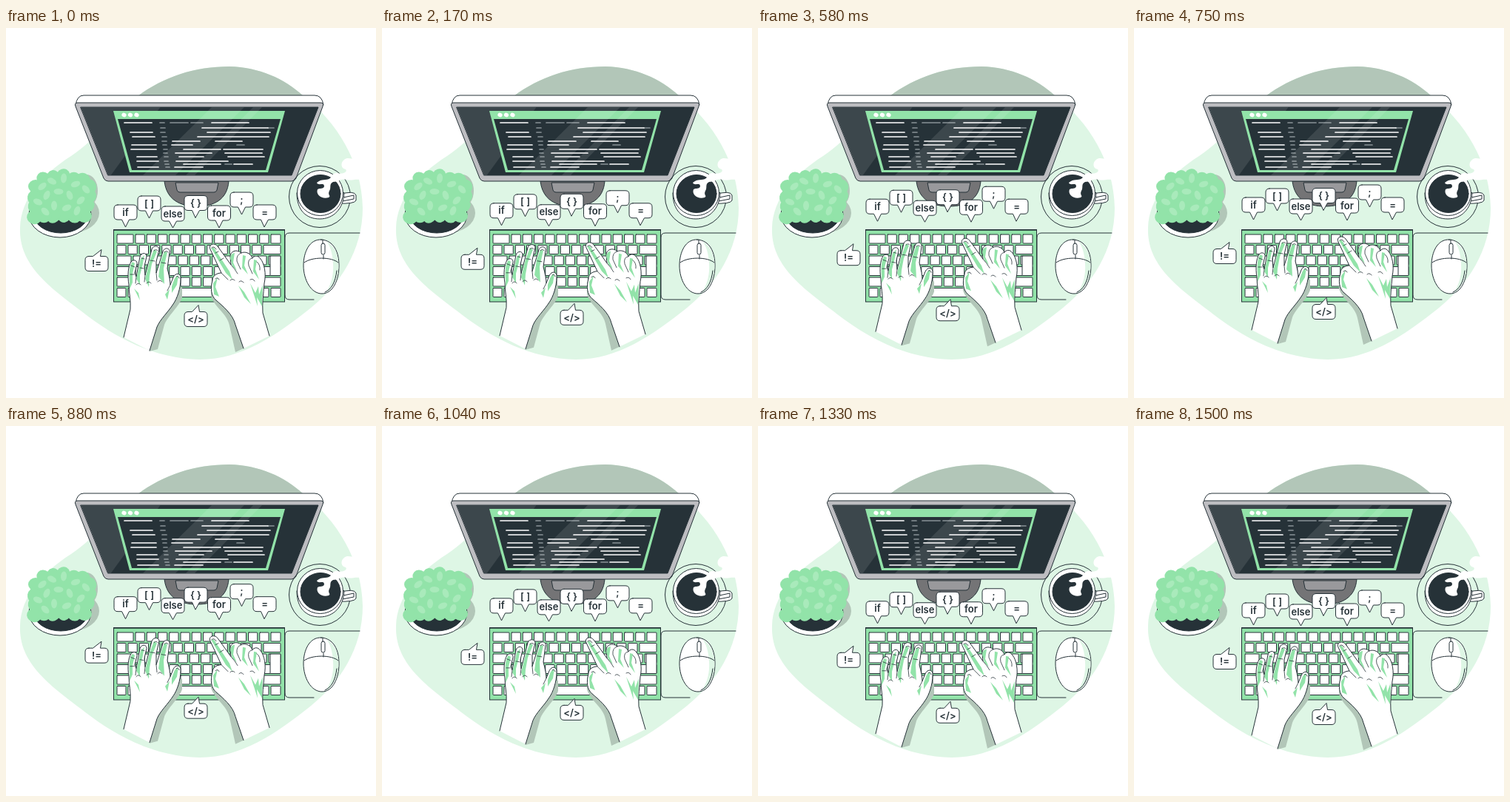
Write an HTML page that moves like this. It is 500 px wide and 500 px high and loops after 1540 ms.

```html
<!DOCTYPE html>
<html lang="en">
<head>
<meta charset="utf-8">
<title>Typing code</title>
<style>
html, body { margin: 0; height: 100%; overflow: hidden; background: #fff; }
svg { display: block; width: 100vw; height: 100vh; }
.line { fill: none; }
.line, .white, .dark { stroke: #263238; stroke-linecap: round; stroke-linejoin: round; }
.white { fill: #fff; }
.dark { fill: #263238; }
.green { fill: #92e3a9; }
.pale { fill: #def6e5; }
.shade { fill: #b2c6b8; }
text { font: 600 13px Inter, "Open Sans", sans-serif; fill: #263238; text-anchor: middle; }
</style>
</head>
<body>
<svg viewBox="0 0 500 500">
  <defs>
    <path id="blob" d="M19 270C20 230 50 197 88 173C123 150 148 114 178 92C213 66 255 52 302 52C342 53 376 68 402 92C447 127 481 181 482 243C482 301 451 347 411 379C367 414 319 448 262 448C202 447 149 420 101 382C59 350 17 320 19 270Z"/>
    <clipPath id="inBlob"><use href="#blob"/></clipPath>
    <clipPath id="inScreen"><path d="M101 107H422L386 199H138Z"/></clipPath>
  </defs>
  <use href="#blob" class="pale"/>
  <path class="shade" clip-path="url(#inBlob)" d="M0 0H500V92H0Z"/>

  <g id="stand">
    <path d="M214 207C217 232 235 241 258 241S299 232 301 207Z" fill="#747476" stroke="#263238"/>
    <path d="M229 209H287L285 219Q284 222 281 222H235Q232 222 231 219Z" fill="#99999c" stroke="#263238"/>
  </g>

  <g id="monitor">
    <path class="white" d="M94 104Q96 91 105 91H417Q427 91 429 104L424 109H99Z"/>
    <path d="M97 101H425Q430 101 428 106L392 203Q390 207 386 207H138Q134 207 132 203L94 106Q92 101 97 101Z" fill="#bdbdc1" stroke="#263238"/>
    <path class="dark" d="M101 107H422L386 199H138Z"/>
    <g clip-path="url(#inScreen)" fill="#fff" opacity=".1">
      <path d="M95 105H210L141 200H130Z"/>
    </g>
    <path class="green" d="M145 112H377L354 195H167Z"/>
    <path d="M151 123H371L351 192H170Z" fill="#263238"/>
    <g fill="#fff">
      <ellipse cx="159.500" cy="117.500" rx="3.200" ry="2.700" transform="rotate(25 159.500 117.500)"/>
      <ellipse cx="168" cy="117.500" rx="3.200" ry="2.700" transform="rotate(25 168 117.500)"/>
      <ellipse cx="176.500" cy="117.500" rx="3.200" ry="2.700" transform="rotate(25 176.500 117.500)"/>
    </g>
    <path class="line" d="M208 128h6m8 0h24m4 0h16M209 135h6m139 0h8M209 141h6M211 147h6M211 153h6M212 158h5m95 0h10M213 164h5M213 169h5M214 174h5M214 180h5M215 184h5m76 0h9M216 188h5" style="stroke:#899296;stroke-width:1.700"/>
    <path class="line" d="M160 128h37m81 0h50M265 135h89M168 141h30m74 0h85M171 147h30m58 0h96M225 153h37m21 0h36M170 158h33m21 0h28M169 164h34m37 0h50m4 0h53M229 169h49m18 0h50M177 174h27m30 0h33m33 0h49M177 180h29m24 0h70M240 184h50m18 0h25M178 188h28m22 0h38" style="stroke:#fff;stroke-width:1.700"/>
    <g clip-path="url(#inScreen)" fill="#fff" opacity=".1">
      <path d="M278 107H322L228 200H184ZM334 107H346L254 200H242Z"/>
    </g>
  </g>

  <g id="plant">
    <ellipse class="shade" cx="88" cy="250" rx="38" ry="27"/>
    <ellipse class="shade" cx="109" cy="220" rx="15" ry="22"/>
    <ellipse class="white" cx="73" cy="252" rx="42" ry="31"/>
    <ellipse class="dark" cx="74" cy="251" rx="37" ry="26"/>
    <g id="leaves" class="green"></g>
  </g>

  <g id="coffee">
    <circle class="line" cx="424" cy="228" r="41.500"/>
    <path class="white" d="M450 225Q471 219 473 226V233Q471 238 448 237ZM456 229L470 226V231L455 234Z"/>
    <path class="white" d="M393 223C393 247 406 258 424 258S456 245 457 223Z"/>
    <ellipse class="white" cx="424.500" cy="223" rx="31" ry="30.500"/>
    <ellipse class="dark" cx="425" cy="224" rx="27" ry="25.500"/>
    <path d="M420 209C427 203 432 207 438 203C443 198 440 196 448 196C456 198 462 194 459 191C452 190 452 181 457 178C463 173 468 180 482 176V206C474 203 466 207 460 205C452 203 450 208 442 208C436 211 440 216 437 220C434 226 440 227 436 229C428 232 418 226 421 218C424 216 429 218 430 214C430 208 422 214 420 209Z" fill="#fff"/>
  </g>

  <g id="mouse">
    <path class="line" d="M478 277H383Q377 277 377 283V361Q377 367 383 367H416"/>
    <path class="white" d="M426 286C410 285 402 303 402 321C402 340 412 359 427 359S450 340 450 321C450 303 443 287 426 286Z"/>
    <path class="pale" d="M433 288.500C445 294 449.500 308 449.500 321C449.500 338 441 354 432 358C440 346 443 333 442 318C441 304 438 294 433 288.500Z"/>
    <path class="line" d="M403 317C413 309 440 309 449 317M428 286V293M429 307V312M447 328C445 344 440 353 431 357"/>
    <rect class="white" x="426" y="291" width="5" height="15" rx="2.500"/>
  </g>

  <g id="keyboard">
    <rect class="green" x="145.500" y="272.500" width="231" height="97.500" stroke="#263238"/>
    <path class="line" d="M146 273H376" stroke-width="1.500"/>
    <g id="keys"></g>
  </g>

  <g id="floating">
    <path class="shade" d="M225 350H238V364C235 375 218 390 214 401L205 434L194 437L198 400ZM277 345V362C282 378 299 386 302 402L310 438L321 433L314 380Z"/>
    <g id="leftHand">
      <path class="white" d="M159 418L168 380C169 368 166 358 166 347C164 334 165 322 169 316C172 312 178 314 177 319L174 331L176 336L181 309C183 303 190 303 190 309L187 322L188 334L197 299C199 293 207 294 207 299L203 316L203 331L212 302C214 296 222 297 221 303L218 325Q222 340 222 347L226 337C229 330 237 331 236 339C236 352 231 366 226 373C219 384 208 394 204 404L194 436"/>
      <path class="green" d="M167 343C166 330 167 320 171 316L174 318L171 332V344L167 353ZM182 312L187 307L184 323L181 334L181 347L176 339ZM194 315L200 299L204 302L197 319L194 335L193 350L188 339ZM209 315L214 302L218 303L213 325L214 346L206 336ZM224 349L228 338L233 334L231 347L224 358ZM215 360L221 353L218 367ZM173 352L179 358L181 368Z"/>
      <path class="line" d="M176 336L175 345M188 334L187 343M203 331L204 341M222 347L218 355M200 301Q203 298 205 301M214 303Q217 300 219 303M230 336Q233 334 234 338M169 321l5 2M183 311l4 1M168 333l5 0M181 324l5 1M195 314l6 1M210 317l6 1M176 347q3-4 6 0M190 345q3-4 6 0M205 343q3-4 6 0" stroke-width=".8"/>
    </g>
    <g id="rightHand">
      <path class="white" d="M356 416L347 385C346 370 348 360 349 345C352 332 349 318 344 312C340 306 335 308 333 311C330 303 322 302 318 304C311 298 303 302 303 309L304 320L286 295C281 289 273 293 276 299L291 331C286 331 279 334 279 341C276 352 277 362 284 368C292 375 307 387 310 401L321 433"/>
      <path class="green" d="M277 297L281 297L302 329L306 340L297 331ZM303 311Q304 304 309 304L307 317L312 328L306 322ZM320 307L324 308L322 321L327 333L319 324ZM335 313L339 314L337 326L342 340L334 329ZM280 345L286 337L283 350L288 363L281 360ZM314 348L322 357L331 373L322 364ZM330 345L337 358L341 349L342 360L347 347L346 376L339 364L340 376Z"/>
      <path class="line" d="M304 320Q309 325 313 332M318 304Q311 306 312 315L317 326M333 311Q326 312 328 321L333 332M291 331L300 340M278 297Q281 294 284 299M283 304l4-2M289 314l5-3M283 339Q286 336 288 340M315 343q3-3 6 1M330 340q4-2 6 2M303 341q3-3 6 0M339 316q5 4 4 11" stroke-width=".8"/>
    </g>
    <g id="bubbles"></g>
  </g>
</svg>
<script>
const $ = id => document.getElementById(id);
const STEP = 1000 / 24, LOOP = 1540, CYCLE = 1500, LIFT = 10;

// Each row: width of the first key and number of regular keys; the last key fills the rest.
const rows = [[22, 12], [12, 12], [19, 12], [22, 11], [22, 11]];
const PITCH = 15.25, RIGHT = 371;
const key = (x, y, w, h = 12) => `<rect class="white" x="${x}" y="${y}" width="${w}" height="${h}" rx=".7"/>`;
let keys = '';
rows.forEach(([first, count], r) => {
  const y = 279 + r * 14.5, start = 153 + first, last = start + count * PITCH;
  keys += key(150, y, first) + key(last, y, RIGHT - last);
  for (let i = 0; i < count; i++) keys += key(start + i * PITCH, y, PITCH - 3);
});
keys += key(357, 308, 14, 26.5);
for (const [x, w] of [[150, 12], [165, 12], [180, 12], [196, 12], [211, 80], [294, 12], [309, 12], [326, 12], [342, 13], [358, 13]])
  keys += key(x, 351.5, w);
$('keys').innerHTML = keys;

const leaf = (x, y, rx, ry, turn = 0) => `<ellipse rx="${rx}" ry="${ry}" transform="translate(${x} ${y}) rotate(${turn})"/>`;
const lobes = [[40, 214], [51, 204], [64, 202], [77, 200], [91, 204], [104, 205], [113, 214], [113, 227], [110, 240], [106, 254], [92, 254], [78, 253], [64, 254], [52, 254], [38, 256], [39, 242], [38, 229]];
const dabs = [[49, 214], [62, 207], [78, 203], [94, 211], [108, 218], [55, 226], [71, 221], [86, 226], [101, 233], [43, 235], [65, 240], [82, 243], [53, 248], [96, 247]];
$('leaves').innerHTML = leaf(76, 228, 38, 32)
  + lobes.map(([x, y], i) => leaf(x, y, 10, 9, i * 40)).join('')
  + '<g fill="#a9eabb">' + dabs.map(([x, y], i) => leaf(x, y, 6.5, 4, i * 67 - 40)).join('') + '</g>';

// Text, left and top edge, tail tip relative to the box; a negative tip points up.
const bubbles = [
  ['if', 146, 239, 15.5, 30], ['[ ]', 178, 227, 15.5, 30], ['else', 210, 241, 15.5, 29],
  ['{ }', 241, 226.5, 15, 30], ['for', 272.5, 240, 15.5, 30], [';', 303, 222, 15.5, 30],
  ['=', 334, 239, 15, 30], ['!=', 107, 308.5, 22, -9], ['</>', 241, 383.5, 19, -9]
];
const escape = s => s.replace(/</g, '&lt;').replace(/>/g, '&gt;');
$('bubbles').innerHTML = bubbles.map(([label, x, y, tipX, tipY]) => {
  const top = tipY < 0 ? `H10.500L${tipX} ${tipY}L20.500 0` : '';
  const bottom = tipY > 0 ? `H20.500L${tipX} ${tipY}L10.500 20` : '';
  const outline = `M5 0${top}H26Q31 0 31 5V15Q31 20 26 20${bottom}H5Q0 20 0 15V5Q0 0 5 0Z`;
  return `<g transform="translate(${x} ${y})"><path class="white" d="${outline}"/><text x="15.500" y="14.500">${escape(label)}</text></g>`;
}).join('');

function draw(now) {
  const time = Math.floor((now % LOOP + 5) / STEP) * STEP;
  const phase = Math.min(time / CYCLE, 1);
  const y = -LIFT * (1 - Math.abs(1 - 2 * phase));
  $('floating').setAttribute('transform', `translate(0 ${y})`);
  requestAnimationFrame(draw);
}
draw(0);
</script>
</body>
</html>
```
